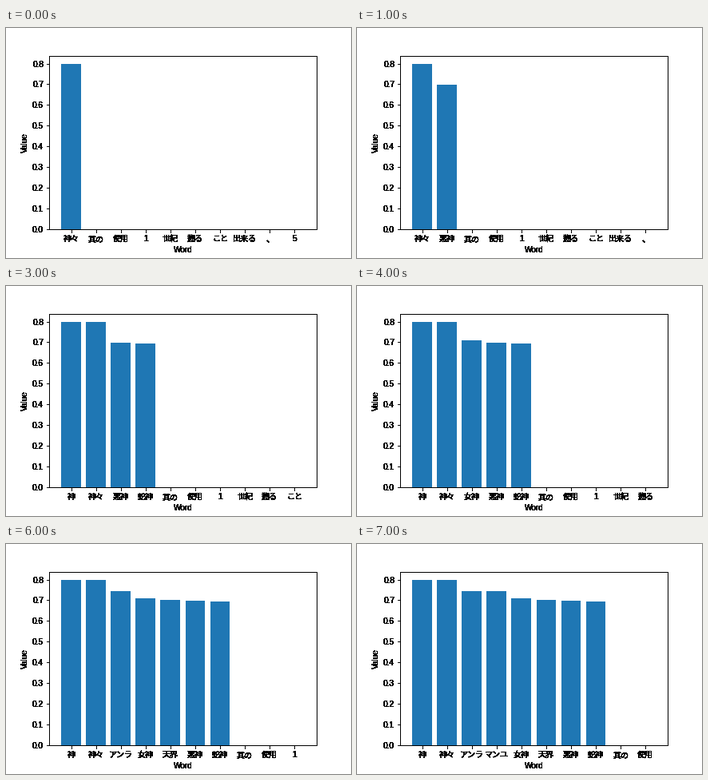
Animation of 432x288 px, one loop 8 s. Source, as a matplotlib script:

```python
import matplotlib.pyplot as plt
from matplotlib.animation import FuncAnimation

plt.rcParams.update({
    "font.family": ["Liberation Sans", "Noto Sans CJK JP"],
    "font.size": 10,
    "axes.unicode_minus": False,
})

SLOTS = 10
LAYERS = 16  # stacked copies darken the antialiased text
RECT = [0.125, 0.125, 0.775, 0.755]

REST = ["其の", "使用", "1", "世紀", "遡る", "こと", "出来る", "、", "5"]
# Words in the order they arrive, one per second
ARRIVALS = [
    ("神々", 0.798), ("悪神", 0.6977), ("蛇神", 0.6937), ("神", 0.7985),
    ("女神", 0.7087), ("天界", 0.7037), ("アンラ", 0.7436), ("マンユ", 0.7426),
]
TOP = 1.05 * max(value for _, value in ARRIVALS)

fig = plt.figure(figsize=(6, 4), dpi=72, facecolor="white")
layers = [fig.add_axes(RECT, label=f"layer{i}") for i in range(LAYERS)]


def ranking(step):
    scored = sorted(ARRIVALS[:step + 1], key=lambda item: -item[1])
    return (scored + [(word, 0) for word in REST])[:SLOTS]


def draw(step):
    words, values = zip(*ranking(step))
    for ax in layers:
        ax.clear()
        ax.patch.set_visible(False)
        ax.bar(range(SLOTS), values, color="#1f77b4")
        ax.set_xticks(range(SLOTS), words)
        ax.set_ylim(0, TOP)
        ax.set_xlabel("Word")
        ax.set_ylabel("Value")
    return []


anim = FuncAnimation(fig, draw, frames=len(ARRIVALS), init_func=lambda: [],
                     interval=1000, repeat=True, repeat_delay=0, blit=False)
plt.show()
```
